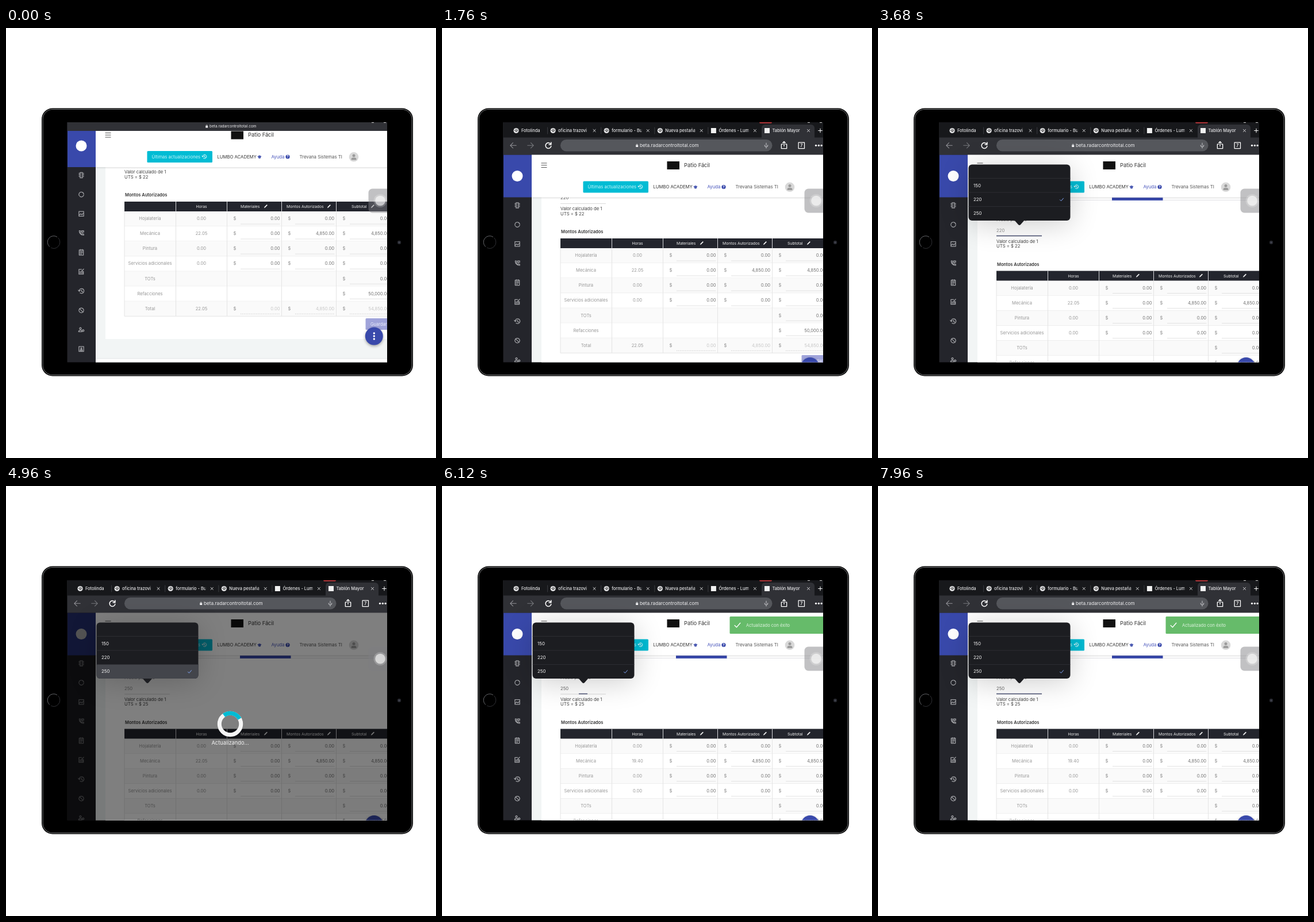
An HTML page with a canvas for the animation above (8000 ms loop, 748x748 px).

```html
<!DOCTYPE html>
<html lang="es">
<head>
<meta charset="utf-8">
<style>
html, body { margin: 0; width: 100%; height: 100%; overflow: hidden; background: #fff }
canvas { display: block }
</style>
</head>
<body>
<canvas id="stage" width="748" height="748"></canvas>
<script>
const g = document.getElementById('stage').getContext('2d');
const LOOP = 8000, DARK = '#24252b', BLUE = '#3949ab';
const clamp = v => Math.max(0, Math.min(1, v));
const ramp = (t, a, b) => clamp((t - a) / (b - a));

// Linear track through [time, value] points.
function track(t, keys) {
  let [a, v] = keys[0];
  for (const [b, w] of keys) {
    if (t <= b) return b > a ? v + (w - v) * (t - a) / (b - a) : w;
    a = b; v = w;
  }
  return v;
}

function rect(x, y, w, h, color, r = 0) {
  g.fillStyle = color;
  g.beginPath();
  g.roundRect(x, y, w, h, r);
  g.fill();
}
function disc(x, y, r, color) {
  g.fillStyle = color;
  g.beginPath();
  g.arc(x, y, r, 0, 7);
  g.fill();
}
function line(points, color, width = 1) {
  g.strokeStyle = color;
  g.lineWidth = width;
  g.beginPath();
  for (let i = 0; i < points.length; i += 2) g.lineTo(points[i], points[i + 1]);
  g.stroke();
}
function arc(x, y, r, from, to, color, width) {
  g.strokeStyle = color;
  g.lineWidth = width;
  g.beginPath();
  g.arc(x, y, r, from, to);
  g.stroke();
}
function text(s, x, y, size, color, align = 'left', weight = 400) {
  g.font = `${weight} ${size}px Inter, Roboto, sans-serif`;
  g.textAlign = align;
  g.textBaseline = 'middle';
  g.fillStyle = color;
  g.fillText(s, x, y);
}
// Icons live in a 24-unit box.
function icon(path, x, y, size, color, width = 2.2, filled = false) {
  g.save();
  g.translate(x - size / 2, y - size / 2);
  g.scale(size / 24, size / 24);
  g.strokeStyle = g.fillStyle = color;
  g.lineWidth = width;
  g.lineCap = g.lineJoin = 'round';
  const p = new Path2D(path);
  if (filled) g.fill(p);
  g.stroke(p);
  g.restore();
}
function faded(alpha, draw) {
  if (alpha <= 0) return;
  g.save();
  g.globalAlpha *= alpha;
  draw();
  g.restore();
}

const HISTORY = 'M5 12a8 8 0 1 1 3 6M2 9l3 4 4-3M13 8v5l4 2';
const PENCIL = 'M4 20l1-4L17 4l3 3L8 19z';
const CHECK = 'M3 13l6 6L21 5';
const MENU = [
  'M8 3h8v18H8zM12 7v.1M12 12v.1M12 17v.1M4 6h3M17 6h3M4 11h3M17 11h3M4 16h3M17 16h3',
  'M13 4a8 8 0 0 1 7 7M20 14a8 8 0 0 1-13 4M5 16a8 8 0 0 1 6-12',
  'M4 4h16v16H4zM5 16l5-4 4 3 5-5',
  'M5 4c0 9 6 15 15 15v-4l-4-1-2 2c-3-1-5-3-6-6l2-2-1-4zM13 4h7v5h-4l-2 2z',
  'M5 4h14v17H5zM8 9h8M8 13h8M8 17h5M9 2v4M15 2v4',
  'M19 11v9H4V4h9M8 17v-6M12 17v-4M16 17v-7M12 11l8-8',
  HISTORY,
  'M12 4a8 8 0 1 0 .1 0M6 6l12 12',
  'M9 5a3 3 0 1 0 .1 0M3 19c0-6 9-7 11-3v3zM18 12a3 3 0 1 0 .1 0',
  'M4 4h16v16H4zM12 8a2 2 0 1 0 .1 0M8 17c0-4 8-4 8 0z'
];
const ROWS = [
  ['Hojalatería', '0.00', '0.00', '0.00', '0.00'],
  ['Mecánica', '', '0.00', '4,850.00', '4,850.00'],
  ['Pintura', '0.00', '0.00', '0.00', '0.00'],
  ['Servicios adicionales', '0.00', '0.00', '0.00', '0.00'],
  ['TOTs', '', '', '', '0.00'],
  ['Refacciones', '', '', '', '50,000.00'],
  ['Total', '', '0.00', '4,850.00', '54,850.00']
];
const EDGES = [206, 295.5, 384.5, 479.5, 574.5];

function table(m, hours) {
  const top = m + 28, step = 26.05, bottom = top + step * 7;
  ROWS.forEach(([name, time, ...sums], i) => {
    const y = top + step * (i + .5), total = i == 6;
    rect(206, y - step / 2, 460, step, i % 2 ? '#fff' : '#fafafa');
    line([206, y + step / 2, 666, y + step / 2], '#e4e4e4');
    text(name, 250.5, y, 7.6, '#979797', 'center');
    text(i == 1 || total ? hours : time, 340, y, 7.6, '#979797', 'center');
    sums.forEach((sum, k) => {
      if (!sum) return;
      const x = EDGES[k + 2];
      text('$', x + 13.5, y, 7.6, '#8b8b8b', 'center');
      text(sum, [476.5, 571, 667][k], y, 7.6, total ? '#c6c6c6' : '#707070', 'right');
      if (total) g.setLineDash([1.5, 1.5]);
      line([x + 23.5, y + 9, x + 92, y + 9], total ? '#cfcfcf' : '#e2e2e2');
      g.setLineDash([]);
    });
  });
  rect(206, m + 11, 460, 17, '#23252d');
  for (const x of EDGES) {
    line([x, m + 11, x, top], '#d8d8dc', x > 206 ? 1 : 0.1);
    line([x, top, x, bottom], '#e4e4e4');
  }
  text('Horas', 340, m + 20, 6.8, '#f2f2f2', 'center');
  [['Materiales', 408, 452], ['Montos Autorizados', 488, 562], ['Subtotal', 601, 638]].forEach(([s, x, px]) => {
    text(s, x, m + 20, 6.8, '#f2f2f2');
    icon(PENCIL, px, m + 19, 8, '#fff', 1, true);
  });
}

function content(t, m) {
  const changed = t >= 4350;
  rect(156, 164, 507, 418, '#f2f5f5');
  rect(173, m - 300, 500, 550, '#fff');
  rect(156, m + 284, 507, 60, '#fff');
  line([156, m + 284, 663, m + 284], '#e2e5e6');
  line([173, m - 112, 663, m - 112], '#e2e2e6');
  rect(407, m - 116.5, 88.5, 5, BLUE);

  text('Precio por UTS', 206, m - 78, 7.4, '#8a8a8a');
  text(changed ? '250' : '220', 206, m - 59, 7.7, t > 2900 && t < 5700 ? '#929292' : '#666');
  line([206, m - 49.5, 285, m - 49.5], '#dadada');
  const focus = t < 4400 ? ramp(t, 2850, 3050) : ramp(t, 6080, 6290);
  if (focus) line([245.5 - 39.5 * focus, m - 50, 245.5 + 39.5 * focus, m - 50], '#4b5376', 1.3);

  text('Valor calculado de 1', 206, m - 40.3, 7.7, '#404040');
  text('UTS = $ ' + (changed ? 25 : 22), 206, m - 31.5, 7.7, '#404040');
  text('Montos Autorizados', 207, m, 7.5, '#333', 'left', 600);
  table(m, t < 5750 ? '22.05' : '19.40');
  rect(625.5, m + 214, 50, 20, '#a0a4da', 1.5);
  text('Guardar', 634, m + 224.3, 7.5, '#eceefb');
}

function header(p) {
  const y = p + 56.3;
  g.save();
  g.shadowColor = 'rgba(0,0,0,.16)';
  g.shadowBlur = 3;
  g.shadowOffsetY = 1;
  rect(156, p, 520, 74, '#fff');
  g.restore();
  for (const dy of [14.5, 18.2, 22]) line([172.5, p + dy, 182.5, p + dy], '#555', 1);
  rect(391.5, p + 11.5, 21.5, 14, '#111');
  text('Patio Fácil', 421, p + 18.3, 9.3, '#333');

  rect(245.5, p + 46, 113.5, 20, '#00bcd4', 1.5);
  text('Últimas actualizaciones', 253.5, y, 7.6, '#c9f5fa');
  icon(HISTORY, 345, y - .5, 10, '#fff');
  text('LUMBO ACADEMY', 367.5, y, 7.7, '#333');
  icon('M2 9l10-5 10 5-10 5zM6 12v5c3 3 9 3 12 0v-5', 441, y, 8, BLUE, 1, true);
  text('Ayuda', 461.5, y, 7.8, '#4d5abd');
  disc(490, y - .3, 3.6, BLUE);
  text('?', 490, y, 6, '#fff', 'center', 700);
  text('Trevana Sistemas TI', 510.5, y, 7.8, '#555');
  disc(605, y, 8.3, '#d9d9d9');
  disc(605, y - 2.2, 2.5, '#9b9b9b');
  rect(600.5, y + 1.2, 9, 4, '#9b9b9b', [3, 3, 1, 1]);
}

function sidebar(p) {
  rect(106, 164, 50, 420, DARK);
  rect(107, p, 49, 74, BLUE);
  disc(131, p + 37, 9.5, '#fff');
  MENU.forEach((d, i) => icon(d, 131, p + 88 + i * 33.6, 12.5, '#a0a1a5', 2.4));
}

function fab(p) {
  g.save();
  g.shadowColor = 'rgba(0,0,0,.35)';
  g.shadowBlur = 5;
  g.shadowOffsetY = 2;
  disc(640.3, p + 368, 15.5, BLUE);
  g.restore();
  for (const dy of [-5, 0, 5]) disc(640.3, p + 368 + dy, 1.7, '#fff');
}

function loader(t) {
  faded(ramp(t, 4480, 4650) * (1 - ramp(t, 5650, 5800)), () => {
    rect(106, 164, 557, 420, 'rgba(0,0,0,.5)');
    rect(106, 164, 50, 420, 'rgba(0,0,0,.35)');
    const a = -1.35 + (t - 4960) / 1000 * Math.PI * 2;
    arc(390, 414, 18.7, 0, 7, '#f5f5f5', 7);
    arc(390, 414, 18.7, a - .85, a + .85, '#00bcd4', 7);
    text('Actualizando...', 390, 447.5, 9.3, '#f2f2f2', 'center');
  });
}

function toast(t) {
  faded(ramp(t, 5780, 5980), () => {
    rect(500.5, 227, 170, 30, '#66bb6a', 1.5);
    icon(CHECK, 514, 242, 13, '#fff', 2.4);
    text('Actualizado con éxito', 529, 242.3, 7.5, '#dff3e0');
  });
}

function tabs(p) {
  const y = p - 42;
  rect(106, 164, 557, Math.max(0, p - 194), '#17181b');
  rect(556, y - 10.5, 92, 24, '#303136', [6, 6, 0, 0]);
  ['Fotolinda', 'oficina trazovi', 'formulario - Bu', 'Nueva pestaña', 'Órdenes - Lum', 'Tablón Mayor'].forEach((s, i) => {
    const x = i ? 100 + 93.1 * i : 129;
    if (i < 4) {
      disc(x, y, 4.6, '#e4e4e6');
      icon('M3 10l6 3 3 5 2-7-4-3 1-4M16 5l4 6-3 5', x, y, 8, '#222', 2.6);
    } else rect(x - 4.5, y - 4.5, 9, 9, '#f1f1f1');
    g.save();
    g.beginPath();
    g.rect(x, y - 8, i ? 61 : 50, 16);
    g.clip();
    text(s, x + 9, y + .3, 7.4, '#e8e8ea', 'left', 500);
    g.restore();
    if (i) icon('M3 3l18 18M21 3L3 21', x + 72, y, 5.5, '#e8e8ea', 4);
    if (i && i < 5) line([x - 9.5, y - 6, x - 9.5, y + 6], '#3b3c41');
  });
  icon('M12 2v20M2 12h20', 658, y, 8, '#fff', 3);
}

function toolbar(p) {
  const y = p - 16.2;
  rect(206, y - 10.3, 368.5, 20.6, '#55575c', 10.3);
  icon('M22 12H2M11 3l-9 9 9 9', 124, y, 12.5, '#929398', 2);
  icon('M2 12h20M13 3l9 9-9 9', 154, y, 12.5, '#77787d', 2);
  icon('M20 8a9 9 0 1 0 1 6M21 2v7h-7', 185, y, 13, '#fff', 2.8);
  icon('M12 3v9M6 11c0 8 12 8 12 0M12 17v5', 564, y, 11, '#b5b6ba', 2.6);
  icon('M8 9H4v13h16V9h-4M12 15V1M8 5l4-4 4 4', 595, y - .5, 14, '#fff', 2.2);
  icon('M2 2h20v20H2z', 625.3, y, 12.5, '#fff', 2.4);
  text('7', 625.3, y + .4, 7, '#fff', 'center', 600);
  for (const x of [650.5, 655.3, 660.1]) disc(x, y, 1.6, '#fff');
}

function chrome(p) {
  const k = (p - 168) / 52.5;
  rect(106, 164, 557, Math.max(179, p) - 164, '#303136');
  faded(ramp(k, .55, 1), () => { tabs(p); toolbar(p); });
  const y = track(k, [[0, 171], [.5, 183.3], [1, 204.3]]);
  const size = track(k, [[0, 6.5], [.5, 7.15], [1, 8.2]]);
  const x = track(k, [[0, 354], [.5, 350.3], [1, 344]]);
  text('beta.radarcontroltotal.com', x, y + .3, size, '#f0f0f2');
  rect(x - 6.8, y - .8, 4, 3.4, '#f0f0f2', .5);
  arc(x - 4.8, y - .9, 1.3, Math.PI, 0, '#f0f0f2', .8);
  if (k > .3) rect(552, 164, 22, 1.8, '#c73b3f', [0, 0, 4, 4]);
  for (const sx of [636, 657]) rect(sx, 164, 4, 1, '#d0d0d0');
}

function popup(t) {
  faded(ramp(t, 2900, 3080), () => {
    g.save();
    g.shadowColor = 'rgba(0,0,0,.2)';
    g.shadowBlur = 50;
    g.shadowOffsetY = 6;
    rect(157.5, 237.5, 177, 97.5, '#1c1d21', 6);
    g.restore();
    g.fillStyle = '#1c1d21';
    g.fill(new Path2D('M237 334h18l-7 8q-2 2-4 0z'));
    if (t > 4250 && t < 5650) rect(157.5, 310.5, 177, 24.5, '#43454b', [0, 0, 6, 6]);
    for (const y of [261.5, 286, 310.5]) line([157.5, y, 334.5, y], '#303136', .8);
    [150, 220, 250].forEach((v, i) => text(v, 166, 274.3 + i * 24.4, 7.9, '#f4f4f4'));
    icon(CHECK, 319.5, t < 4350 ? 298.5 : 323, 8, '#82a8fa', 3);
  });
}

function touchButton() {
  rect(630.5, 279.5, 42, 42, 'rgba(125,125,130,.48)', 7);
  disc(651, 300.5, 11.5, 'rgba(255,255,255,.2)');
  disc(651, 300.5, 8.8, 'rgba(255,255,255,.6)');
}

function tablet() {
  rect(62, 139.5, 646, 466, '#050505', 19);
  g.strokeStyle = '#77787a';
  g.lineWidth = 1;
  g.beginPath();
  g.roundRect(64, 141.5, 642, 462, 17);
  g.stroke();
  rect(65, 142.5, 640, 460, '#000', 16);
  arc(83, 372.5, 10.8, 2.3, 5.3, '#65666a', 1);
  arc(83, 372.5, 10.8, 5.5, 8.3, '#303135', 1);
  disc(684, 373, 3.2, '#25262c');
  disc(684, 373, 1.5, '#454753');
}

function draw(t) {
  const p = track(t, [[0, 168], [200, 168], [440, 194], [700, 220.5]]);
  const m = track(t, [[0, 291], [200, 291], [440, 298.5], [800, 340], [1050, 354], [1760, 355], [1900, 357], [2250, 402], [2500, 411.5]]);
  rect(0, 0, 748, 748, '#fff');
  tablet();
  g.save();
  g.beginPath();
  g.rect(106.5, 164, 556.5, 417.5);
  g.clip();
  content(t, m);
  header(p);
  sidebar(p);
  fab(p);
  loader(t);
  toast(t);
  chrome(p);
  popup(t);
  touchButton();
  g.restore();
}

let start;
function tick(now) {
  start ??= now;
  draw((now - start) % LOOP);
  requestAnimationFrame(tick);
}
draw(0);
requestAnimationFrame(tick);
</script>
</body>
</html>
```
